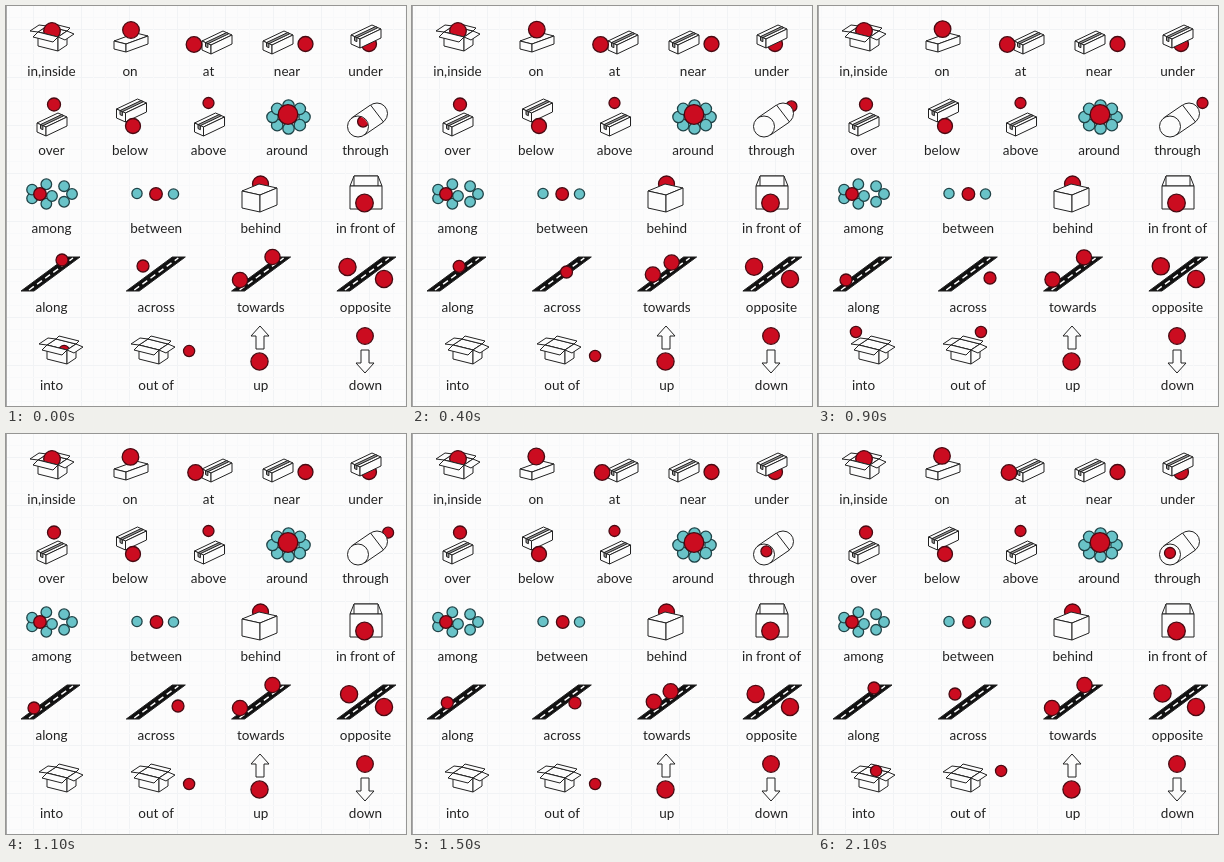
These frames come from a looping animation (400 by 400 pixels, 2200 ms). An HTML page with a canvas:

```html
<!DOCTYPE html>
<html lang="en">
<head>
<meta charset="utf-8">
<title>Prepositions</title>
<style>
html, body { margin: 0; width: 100%; height: 100%; overflow: hidden; background: #fcfcfc; }
canvas { display: block; width: 100vw; height: 100vh; }
</style>
</head>
<body>
<canvas id="stage" width="400" height="400"></canvas>
<script>
const ctx = document.getElementById('stage').getContext('2d');
const LOOP = 2200, STEP = 100, CYCLE = 10.7;
const INK = '#222', RED = '#cb0c20', TEAL = '#69c3c8', PAPER = '#fcfcfc';

const rows = [
  ['in,inside', 'on', 'at', 'near', 'under'],
  ['over', 'below', 'above', 'around', 'through'],
  ['among', 'between', 'behind', 'in front of'],
  ['along', 'across', 'towards', 'opposite'],
  ['into', 'out of', 'up', 'down']
];

function ease(t, from, to) {
  const u = Math.min(1, Math.max(0, (t - from) / (to - from)));
  return u * u * (3 - 2 * u);
}

// Goes from 0 to 1 during a..b and back during c..d
const sweep = (t, a, b, c, d) => ease(t, a, b) - ease(t, c, d);

function shape(fill, stroke = INK, width = 1) {
  if (fill) {
    ctx.fillStyle = fill;
    ctx.fill();
  }
  ctx.strokeStyle = stroke;
  ctx.lineWidth = width;
  ctx.stroke();
}

function disc(x, y, r, fill = PAPER) {
  ctx.beginPath();
  ctx.arc(x, y, r, 0, 7);
  shape(fill);
}

function ball(x, y, r, fill = RED) {
  ctx.beginPath();
  ctx.arc(x, y, r, 0, 7);
  shape(fill, fill === RED ? '#480a12' : '#1f4347', 1.3);
}

function ring(count, x, y, rx, ry, r) {
  for (let i = 0; i < count; i++) {
    const a = i * 2 * Math.PI / count;
    ball(x + rx * Math.cos(a), y + ry * Math.sin(a), r, TEAL);
  }
}

function poly(x, y, pts, fill = PAPER) {
  ctx.beginPath();
  for (let i = 0; i < pts.length; i += 2) ctx.lineTo(x + pts[i], y + pts[i + 1]);
  ctx.closePath();
  shape(fill);
}

// Parallelogram spanned by two edges
function quad(x, y, ax, ay, bx, by, fill) {
  poly(x, y, [0, 0, ax, ay, ax + bx, ay + by, bx, by], fill);
}

// Edge a leads to the back, edge b to the front
function cuboid(x, y, ax, ay, bx, by, h) {
  quad(x, y, ax, ay, bx, by);
  quad(x, y, bx, by, 0, h);
  quad(x + bx, y + by, ax, ay, 0, h);
}

function parcel(x, y) {
  cuboid(x, y, 21, -10, 9, 4, 9);
  quad(x + 3.5, y + 1.6, 21, -10, 2.4, 1.1, '#999');
  quad(x + 3.5, y + 1.6, 2.4, 1.1, 0, 4, '#999');
}

function openBox(x, y, bx, by, r) {
  const [lx, ly, fx, fy] = [x - 14, y - 6, x + 6, y - 1];
  quad(lx, ly, 9, -6, 20, 5);
  quad(lx + 9, ly - 6, 20, 5, 3, -3);
  quad(lx, ly, 9, -6, -8, -1);
  ball(bx, by, r);
  quad(lx, ly, 20, 5, 0, 14);
  quad(fx, fy, 9, -6, 0, 14);
  quad(lx, ly, 20, 5, -5, 5);
  quad(fx, fy, 9, -6, 7, 3);
}

function road(x) {
  quad(x, 285, 13, 0, 46, -34, '#111');
  ctx.setLineDash([6, 4]);
  ctx.beginPath();
  ctx.moveTo(x + 8, 284);
  ctx.lineTo(x + 52, 252);
  shape(null, '#fff', 1.5);
  ctx.setLineDash([]);
}

function tube(x, y) {
  const outside = x >= 369;
  if (outside) ball(x, y, 5.5);
  disc(371, 107.5, 10.5);
  quad(345.5, 112, 19, -13, 13, 17);
  disc(352, 120.5, 10.5);
  if (outside) return;
  ctx.save();
  ctx.beginPath();
  ctx.arc(352, 120.5, 10, 0, 7);
  ctx.clip();
  ball(x, y, 5.5);
  ctx.restore();
}

function arrow(x, y, s) {
  poly(x, y, [0, 0, 9, 10 * s, 4, 10 * s, 4, 23 * s, -4, 23 * s, -4, 10 * s, -9, 10 * s]);
}

function paper() {
  ctx.fillStyle = PAPER;
  ctx.fillRect(0, 0, 400, 400);
  for (let i = 0; i < 34; i++) {
    const p = 3 + i * 12;
    ctx.fillStyle = i % 4 === 2 ? '#f1f3f5' : '#f8f9fa';
    ctx.fillRect(p, 0, 1, 400);
    ctx.fillRect(0, p - 4, 400, 1);
  }
  ctx.fillStyle = '#aaa';
  ctx.fillRect(0, 0, 1, 400);
}

function draw(step) {
  const drift = step / 7;
  const slide = sweep(step, 1, 9, 13, 19);
  const cross = sweep(step, 0, 8, 13, 19);
  const pass = sweep(step, -2, 6, 10, 16);
  const meet = 9.5 * Math.sin(Math.PI * step / CYCLE) ** 4;
  const toss = (step + 2.6) % CYCLE;
  const tossX = 15.5 * Math.min(toss, 2.2);
  const tossY = Math.min(350, 326 + 7 * (toss - 0.95) ** 2);

  ctx.lineJoin = 'round';
  paper();

  openBox(46, 32, 46, 25, 8.3);
  cuboid(108, 35, 22, -8, 12, 3, 8);
  ball(125 - drift / 3, 24 - drift * 0.7, 8.3);
  parcel(196, 35);
  ball(188 + drift, 38.5, 7.8);
  parcel(257, 35);
  ball(299.5, 38, 7.5);
  ball(363, 38, 7.5);
  parcel(345, 29);

  parcel(31, 117);
  ball(48, 98.5, 6.5);
  parcel(110.5, 103);
  ball(127, 120, 7.5);
  parcel(188.5, 117);
  ball(202.5, 97, 5.5);
  ring(8, 282.5, 111, 16, 11.5, 5.7);
  ball(282, 108.5, 9.8);
  tube(352 + 32.5 * pass, 119 - 22 * pass);

  ring(7, 45, 188, 21, 10, 5.3);
  ball(46, 190, 5.3, TEAL);
  ball(34, 188, 6.3);
  ball(131, 187.5, 5.1, TEAL);
  ball(150 + drift / 3, 188, 6.3);
  ball(167.5, 188, 5.1, TEAL);
  ball(254.5, 178, 8);
  cuboid(236, 185, 17, -7, 18, 4, 17);
  poly(344, 170, [0, 10, 4, 0, 28, 0, 32, 10]);
  quad(348, 170, 24, 0, 0, 10);
  quad(344, 180, 32, 0, 0, 23);
  ball(358.5, 197, 8.8);

  for (let i = 0; i < 4; i++) road(15 + 105.3 * i);
  ball(56 - 28 * slide, 254 + 20 * slide, 6);
  ball(137 + 35 * cross, 260 + 12 * cross, 6);
  ball(234 + meet, 274 - 0.8 * meet, 7.6);
  ball(266.5 - meet, 251 + 0.8 * meet, 7.6);
  ball(341.5 + drift, 261 - drift / 2, 8.6);
  ball(378, 273, 8.6);

  openBox(55, 345, 24 + tossX, tossY, 5.6);
  openBox(147, 345, 149 + tossX, tossY, 5.6);
  arrow(254, 320, 1);
  ball(253.5, 355.5, 8.6);
  ball(359, 330, 8.3);
  arrow(359, 367, -1);

  ctx.font = '13.5px Lato, sans-serif';
  ctx.textAlign = 'center';
  ctx.fillStyle = INK;
  rows.forEach((words, row) => {
    const gap = 314 / (words.length - 1);
    words.forEach((word, i) => ctx.fillText(word, 45.5 + gap * i, 70 + 78.5 * row));
  });
}

const start = performance.now();
function tick() {
  draw(Math.floor((performance.now() - start) % LOOP / STEP));
  requestAnimationFrame(tick);
}
tick();
</script>
</body>
</html>
```
